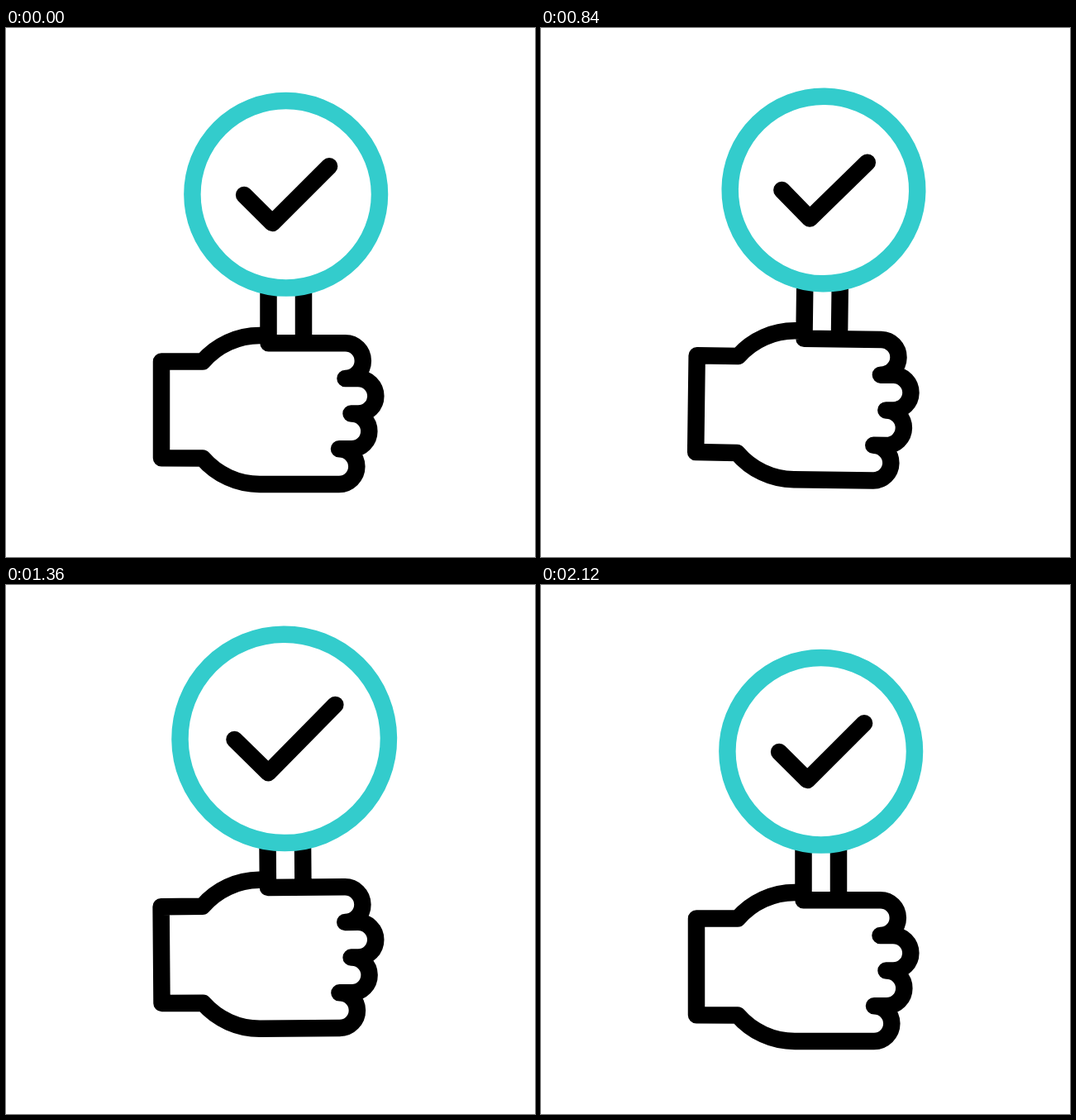
Write an HTML page with a canvas that moves like this. It is 640 px wide and 640 px high and loops after 2.16 s.

```html
<!DOCTYPE html>
<html lang="en">
<head>
<meta charset="utf-8">
<title>Approval sign</title>
<style>
  html, body { margin: 0; width: 100%; height: 100%; overflow: hidden; background: #fff; }
  canvas { display: block; width: 640px; height: 640px; }
</style>
</head>
<body>
<canvas id="stage" width="640" height="640"></canvas>
<script>
const ctx = document.getElementById('stage').getContext('2d');
const LOOP = 2160, STEP = 40, LINE = 20.5;
const PIVOT = { x: 320, y: 455 };
const DISC = { x: 338.7, y: 201.3, r: 113.3 };
const HALF = Math.PI / 2;

// Keys are [time, value]; every span eases in and out.
const TILT = [[160, 0], [650, 8], [1055, -8], [1090, -8], [1550, 4], [2110, 0]];
const LIFT = [[160, 0], [650, 46], [1055, -67.5], [1090, -67.5], [1550, 15.5], [2110, 0]];
const DISC_SCALE = [[1150, 1], [1520, 1.19], [1560, 1.19], [2110, 1]];
const TICK_SCALE = [[1150, 1], [1935, 4.12, 0.69, 0.73], [2110, 1]];

// Cubic timing curve with flat ends; a and b are the handle positions.
function ease(x, a = 1 / 3, b = 2 / 3) {
  let lo = 0, hi = 1;
  for (let i = 0; i < 24; i++) {
    const u = (lo + hi) / 2, v = 1 - u;
    if (3 * v * v * u * a + 3 * v * u * u * b + u * u * u < x) lo = u;
    else hi = u;
  }
  return lo * lo * (3 - 2 * lo);
}

function valueAt(keys, t) {
  if (t <= keys[0][0]) return keys[0][1];
  for (let i = 1; i < keys.length; i++) {
    const [t0, v0] = keys[i - 1];
    const [t1, v1, a, b] = keys[i];
    if (t < t1) return v0 + (v1 - v0) * ease((t - t0) / (t1 - t0), a, b);
  }
  return keys[keys.length - 1][1];
}

function stroke(color, build) {
  ctx.strokeStyle = color;
  ctx.beginPath();
  build();
  ctx.stroke();
}

function drawHand() {
  const r = 21.33, top = 381.3, bend = 91.3, sweep = Math.asin(69 / bend);
  stroke('#000', () => {
    // Handle and first finger
    ctx.moveTo(317.5, 300);
    ctx.lineTo(317.5, top);
    ctx.lineTo(410.5, top);
    ctx.arc(410.5, top + r, r, -HALF, HALF);
    ctx.moveTo(360, 300);
    ctx.lineTo(360, top);
    // Second and third fingers
    ctx.moveTo(410.5, top + 2 * r);
    ctx.arc(426, top + 3 * r, r, -HALF, HALF);
    ctx.lineTo(417.5, top + 4 * r);
    ctx.moveTo(417.5, top + 4 * r);
    ctx.arc(418, top + 5 * r, r, -HALF, HALF);
    ctx.lineTo(403, top + 6 * r);
    // Fourth finger, palm and cuff
    ctx.moveTo(403, top + 6 * r);
    ctx.arc(403, top + 7 * r, r, -HALF, HALF);
    ctx.arc(307, 552 - bend, bend, HALF, HALF + sweep);
    ctx.lineTo(188, 520.3);
    ctx.lineTo(188, 403.5);
    ctx.lineTo(238, 403.5);
    ctx.arc(307, 372 + bend, bend, -HALF - sweep, -HALF);
    ctx.lineTo(312, 372);
  });
}

function drawDisc(scale) {
  ctx.fillStyle = '#fff';
  stroke('#33cccc', () => {
    ctx.arc(DISC.x, DISC.y, DISC.r * scale, 0, Math.PI * 2);
    ctx.fill();
  });
}

function drawTick(scale) {
  const x = 339.8, y = 201.5;
  stroke('#000', () => {
    for (const [dx, dy] of [[-51.7, 0.4], [-17.5, 34.5], [51.3, -34.3]]) {
      ctx.lineTo(x + dx * scale, y + dy * scale);
    }
  });
}

function draw(t) {
  ctx.setTransform(1, 0, 0, 1, 0, 0);
  ctx.fillStyle = '#fff';
  ctx.fillRect(0, 0, 640, 640);
  ctx.lineWidth = LINE;
  ctx.lineCap = ctx.lineJoin = 'round';
  ctx.translate(PIVOT.x, PIVOT.y + valueAt(LIFT, t));
  ctx.rotate(valueAt(TILT, t) * Math.PI / 180);
  ctx.translate(-PIVOT.x, -PIVOT.y);
  drawHand();
  drawDisc(valueAt(DISC_SCALE, t));
  drawTick(valueAt(TICK_SCALE, t));
}

const start = performance.now();
function tick() {
  const t = (performance.now() - start) % LOOP;
  draw(Math.floor(t / STEP) * STEP);
  requestAnimationFrame(tick);
}
tick();
</script>
</body>
</html>
```
